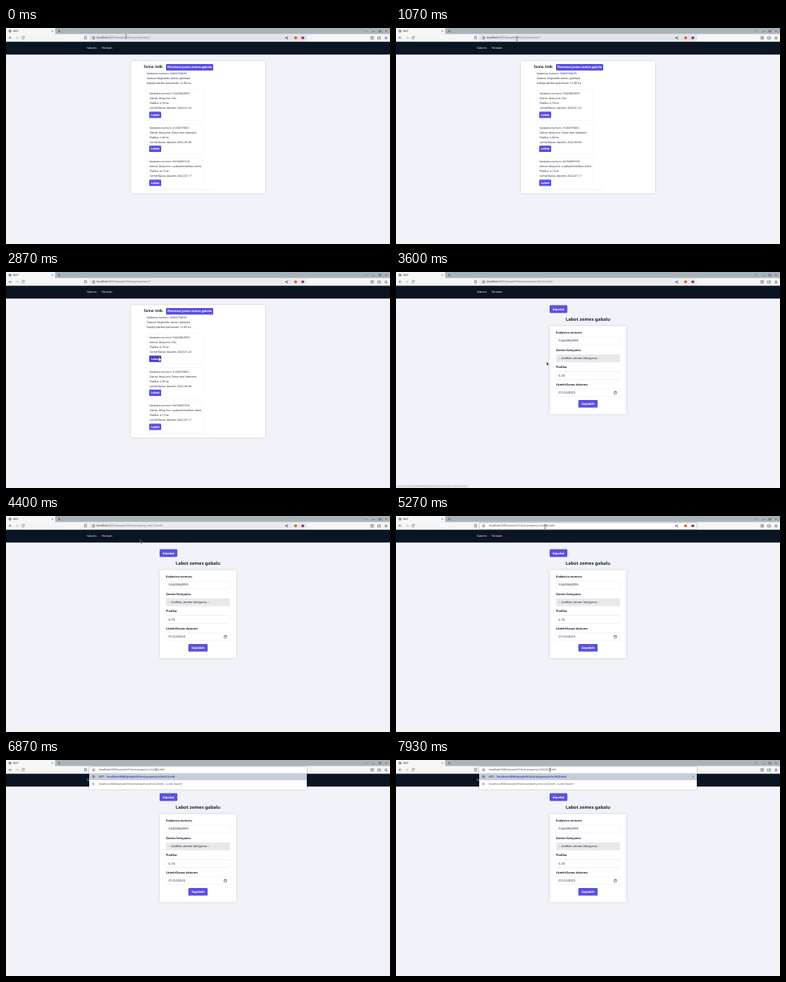
An HTML page that plays this animation: 480 px wide and 270 px high, repeating every 8000 ms.

```html
<!DOCTYPE html>
<html lang="lv">
<head>
<meta charset="utf-8">
<title>RGP</title>
<style>
  html, body { margin: 0; width: 100%; height: 100%; overflow: hidden; background: #f1f3f8; }
  svg { display: block; width: 480px; height: 270px; }
  text { font-family: "Noto Sans", "Open Sans", sans-serif; white-space: pre; text-rendering: geometricPrecision; }
  .card { fill: #fff; filter: drop-shadow(0 .5px 1px #0003); }
  .btn { fill: #5b50e0; }
  .btn.hover { fill: #4338ca; }
  .box { fill: #fff; stroke: #e5e7eb; stroke-width: .25; }
  .input { filter: drop-shadow(0 .3px .3px #0002); }
  .icon { fill: none; stroke: #3c4043; stroke-width: .5; }
</style>
</head>
<body>
<svg id="stage" viewBox="0 0 480 270"></svg>
<script>
const LOOP = 8000, INK = '#1f2937';
const BASE = 'localhost:8000/people/9/land-propert';
const stage = document.getElementById('stage');

const rect = (x, y, w, h, attrs = '') => `<rect x="${x}" y="${y}" width="${w}" height="${h}" ${attrs}/>`;
const icon = (d, attrs = '') => `<path class="icon" d="${d}" ${attrs}/>`;
const cross = (x, y, r) => icon(`M${x - r} ${y - r}l${2 * r} ${2 * r}m0 ${-2 * r}l${-2 * r} ${2 * r}`);
// y is the optical middle of the line
const text = (x, y, str, size = 3.35, fill = INK, attrs = '') =>
  `<text x="${x}" y="${y + size * .33}" font-size="${size}" fill="${fill}" ${attrs}>${str}</text>`;
const bold = (x, y, str, size = 3.72, fill = INK, attrs = '') =>
  text(x, y, str, size, fill, 'font-weight="700" ' + attrs);
const button = (x, y, w, h, label) =>
  rect(x, y, w, h, 'rx="1.2" class="btn"') +
  bold(x + w / 2, y + h / 2, label, 3.72, '#fff', 'text-anchor="middle"');

function browserBar() {
  return rect(0, 0, 480, 8, 'fill="#a9b4b9"') +
    rect(0, 0, 61.5, 9, 'rx="1" fill="#f5f6f7"') +
    rect(0, 7.5, 480, 9.8, 'fill="#f5f6f7"') +
    '<circle cx="5" cy="3.9" r="1.5" class="icon"/>' + icon('M3.6 3.5h1.6l.6 1.6M5 2.5l1 1') +
    text(9, 4, 'RGP', 3.4) + cross(58, 3.9, .7) +
    icon('M65 3.9h3M66.5 2.4v3M449 3.3l1.2 1.2 1.2-1.2M458.2 4.5h2.4M466 3h2.4v2h-2.4z') + cross(475, 3.9, .9) +
    icon('M7 12.2H3.7m1.6-1.6l-1.6 1.6 1.6 1.6') +
    icon('M12 12.2h3.3m-1.6-1.6l1.6 1.6-1.6 1.6', 'opacity=".4"') +
    icon('M22.8 11.2a1.6 1.6 0 1 0 .2 1.4M23 10.3v1.2h-1.2') +
    icon('M98.3 10.4h2.4v3.6l-1.2-1-1.2 1z') +
    rect(104, 8.4, 272, 8, 'rx="1" id="field"') +
    '<circle cx="109.5" cy="12.3" r="1.5" class="icon"/>' + icon('M109.5 12v1.2m0-2v.3') +
    '<g id="actions">' + icon('M349.6 12.3l2.2-1.1m-2.2 1.1l2.2 1.1') +
    '<circle cx="349.6" cy="12.3" r=".5"/><circle cx="351.9" cy="11.2" r=".5"/><circle cx="351.9" cy="13.4" r=".5"/>' +
    '<circle cx="362" cy="12.2" r="1.8" fill="#f0532d"/></g>' +
    '<circle id="badge" cx="371" cy="12.3" r="1.8" fill="#a8264b"/>' +
    icon('M456 10.8h3.2v3H456zM458 10.8v3M464.5 11h3.4v2.8h-3.4zM466.5 12.4h1.4M473.5 11.2h3.2m-3.2 1.2h3.2m-3.2 1.2h3.2') +
    rect(0, 17.2, 480, 16, 'fill="#0b1422"') +
    text(101, 25, 'Sākums', 3.35, '#fff') + text(119.5, 25, 'Pārskats', 3.35, '#fff');
}

function listPage() {
  const plots = [
    ['53429862999', 'Cits', '6.70', '2023-01-22'],
    ['31268193061', 'Zeme zem ūdeņiem', '2.06', '2022-09-06'],
    ['94194031918', 'Lauksaimniecības zeme', '4.13', '2022-07-17'],
  ];
  const lines = (x, y, rows) => rows.map((row, i) => text(x, y + 6 * i, row)).join('');
  return rect(156, 41.2, 168, 165.6, 'rx="1.5" class="card"') +
    bold(172, 48.8, 'Tamo Velk', 4.72) +
    button(200, 45, 59, 8.3, 'Pievienot jaunu zemes gabalu') +
    lines(176, 56.8, ['Kadastra numurs: 36693734635', 'Statuss: Reģistrēts zemes grāmatā',
      'Kopējā platība īpašumam: 12.89 ha']) +
    plots.map(([id, use, area, date], i) => {
      const y = 42.5 * i;
      return rect(176, y + 77, 70.5, 38, 'class="box"') +
        lines(179.5, y + 82.2, ['Kadastra numurs: ' + id, 'Zemes lietojums: ' + use,
          `Platība: ${area} ha`, 'Uzmērīšanas datums: ' + date]) +
        button(179, y + 104.4, 15, 8.2, 'Labot');
    }).join('') +
    rect(176, 202.6, 83, .5, 'fill="#e5e7eb"');
}

function editPage() {
  const field = (y, label, value, select) =>
    bold(200, y, label) +
    rect(200, y + 5.2, 80, 9.8, select ? 'rx="1" fill="#e9e9ec"' : 'rx="1" class="box input"') +
    text(203.3, y + 10.2, value, 3.9);
  return button(192, 41.4, 22.2, 9.8, 'Atpakaļ') +
    bold(240, 59, 'Labot zemes gabalu', 5.63, INK, 'text-anchor="middle"') +
    rect(192, 67.4, 96, 110.4, 'rx="1" class="card"') +
    field(76, 'Kadastra numurs:', '53429862999') +
    field(97.7, 'Zemes lietojums:', '-- Izvēlies zemes lietojumu --', true) +
    field(119.2, 'Platība:', '6.70') +
    field(140.8, 'Uzmērīšanas datums:', '01/22/2023') +
    icon('M272.7 149.6h3v3h-3zM272.7 150.2h3M273.5 149v.6m1.4-.6v.6') +
    button(228, 160, 24, 9.6, 'Saglabāt') +
    '<g id="status">' + rect(0, 265.6, 91, 5, 'fill="#e3e6ea"') +
    text(1.5, 268, 'http://' + BASE + 'y-info/7/2/edit', 3.2, '#6b7280') + '</g>';
}

function suggestions() {
  return rect(104, 8.4, 272, 28.4, 'rx="1" class="card"') +
    rect(104, 16.5, 272, 8.7, 'fill="#c6ccd8"') +
    '<circle cx="109.5" cy="12.3" r="1.5" class="icon"/>' + icon('M109.5 12v1.2m0-2v.3') +
    '<circle cx="109.5" cy="20.8" r="1.4" class="icon"/>' + icon('M108.2 20.4h1.5l.6 1.5') +
    text(116, 20.9, 'RGP -', 3.3) +
    text(126, 20.9, '', 3.3, '#2449b8', 'font-weight="600" id="match"') +
    '<g id="remove">' + cross(371.5, 20.8, .8) + '</g>' +
    '<circle cx="109.2" cy="29.7" r="1" class="icon"/>' + icon('M110 30.5l1 1') +
    text(116, 30, '', 3.33, '#4b5058', 'id="search"');
}

const POINTERS = {
  beam: '<path d="M-.9-2.4Q0-2.4 0-1.8 0-2.4 .9-2.4M0-1.8V1.8M-.9 2.4Q0 2.4 0 1.8 0 2.4 .9 2.4" fill="none" stroke="#222" stroke-width=".5"/>',
  arrow: '<path d="M0 0V4.4L1 3.5 1.7 5 2.4 4.7 1.7 3.2H3Z" fill="#111" stroke="#fff" stroke-width=".3"/>',
  hand: '<path d="M-.5 0Q0-.5 .4 0V1.7L2.4 2.2V3.8L1.8 5H-.5L-1.8 2.8-1.2 2.4-.5 3Z" fill="#fff" stroke="#111" stroke-width=".35"/>',
};

stage.innerHTML = rect(0, 0, 480, 270, 'fill="#f1f3f8"') +
  `<g id="list">${listPage()}</g><g id="edit">${editPage()}</g>${browserBar()}` +
  `<g id="drop">${suggestions()}</g>` + rect(0, 10.2, 2, 4.2, 'id="mark" fill="#a9c4f5"') +
  text(113.5, 12.3, '<tspan id="host" fill="#222">localhost</tspan><tspan id="path"></tspan>', 3.38, '#6b7075', 'id="url"') +
  rect(0, 10.2, .4, 4.2, 'id="caret"') +
  `<g id="pointer">${Object.entries(POINTERS).map(([k, p]) => `<g id="${k}">${p}</g>`).join('')}</g>`;

const el = Object.fromEntries([...stage.querySelectorAll('[id]')].map(e => [e.id, e]));
const show = (node, on) => { node.style.display = on ? '' : 'none'; };
const setText = (node, str) => { if (node.textContent !== str) node.textContent = str; };
const buttons = [...stage.querySelectorAll('.btn')].map(node => {
  const [x, y, w, h] = ['x', 'y', 'width', 'height'].map(a => +node.getAttribute(a));
  return { node, x, y, w, h };
});

// time, x, y
const TRACK = [
  [0, 150, 10.8], [1000, 150, 10.8], [1700, 188.3, 110], [1870, 188.3, 110], [1930, 188, 127],
  [2270, 188, 127], [2400, 187, 129.5], [2600, 187, 129.5], [2700, 186, 147], [2870, 191.5, 106],
  [3330, 188.3, 112.2], [3600, 188.3, 112.2], [4270, 168, 29.8], [4400, 168, 29.8], [4600, 178, 38],
  [5000, 186, 13.5], [5530, 186, 13.5], [5600, 185.6, 17.2], [7860, 185.6, 17.2], [7870, 192.5, 12.4], [LOOP, 192.5, 12.4],
];

function pointerAt(t) {
  const i = TRACK.findIndex(k => k[0] > t);
  const [t0, x0, y0] = TRACK[i - 1], [t1, x1, y1] = TRACK[i];
  const p = (t - t0) / (t1 - t0), e = p * p * (3 - 2 * p);
  return [x0 + (x1 - x0) * e, y0 + (y1 - y0) * e];
}

function draw(t) {
  const editing = t >= 3470, focused = t >= 5200, typing = t >= 6735;
  const [x, y] = pointerAt(t);
  const overField = x > 104 && x < 376 && y > 8 && y < 16.5;

  show(el.list, !editing);
  show(el.edit, editing);
  el.status.style.opacity = Math.max(0, Math.min(1, (3850 - t) / 400));

  let overButton = false;
  for (const b of buttons) {
    const shown = !!b.node.closest('#edit') === editing;
    const hit = shown && x >= b.x && x <= b.x + b.w && y >= b.y && y <= b.y + b.h;
    b.node.classList.toggle('hover', hit);
    overButton ||= hit;
  }

  const id = t < 6200 ? '7' : t < 6735 ? '' : t < 7070 ? '2' : '20';
  const address = BASE + (editing ? `y-info/${id}/2/edit` : 'ies/7');
  setText(el.path, address.slice(9));
  el.url.setAttribute('x', focused ? 116.3 : 113.5);
  el.url.setAttribute('fill', focused ? '#3f4449' : '#6b7075');
  el.field.setAttribute('fill', focused ? '#fff' : overField ? '#e0e3e7' : '#e9ebee');
  el.field.setAttribute('stroke', focused ? '#a3a9bd' : 'none');
  el.field.setAttribute('stroke-width', .5);
  show(el.actions, t < 6200);
  show(el.badge, t < 6200);

  show(el.drop, typing);
  show(el.remove, t >= 7070);
  setText(el.match, address);
  setText(el.search, address + ' - Lunet Search');

  const start = (BASE + 'y-info/').length;
  const charX = n => el.url.getStartPositionOfChar(n).x;
  const selected = t >= 6000 && t < 6200;
  show(el.mark, selected);
  show(el.caret, focused && !selected && !(t >= 7530));
  if (focused) {
    el.mark.setAttribute('x', charX(start));
    el.caret.setAttribute('x', charX(start + id.length) - .2);
  }

  const overText = !editing && x > 176 && y > 118 && y < 146;
  const kind = overButton ? 'hand' : overField || overText ? 'beam' : 'arrow';
  for (const k in POINTERS) show(el[k], k === kind);
  show(el.pointer, !typing || t >= 7870);
  el.pointer.setAttribute('transform', `translate(${x} ${y})`);
}

function tick() {
  draw(performance.now() % LOOP);
  requestAnimationFrame(tick);
}
tick();
</script>
</body>
</html>
```
